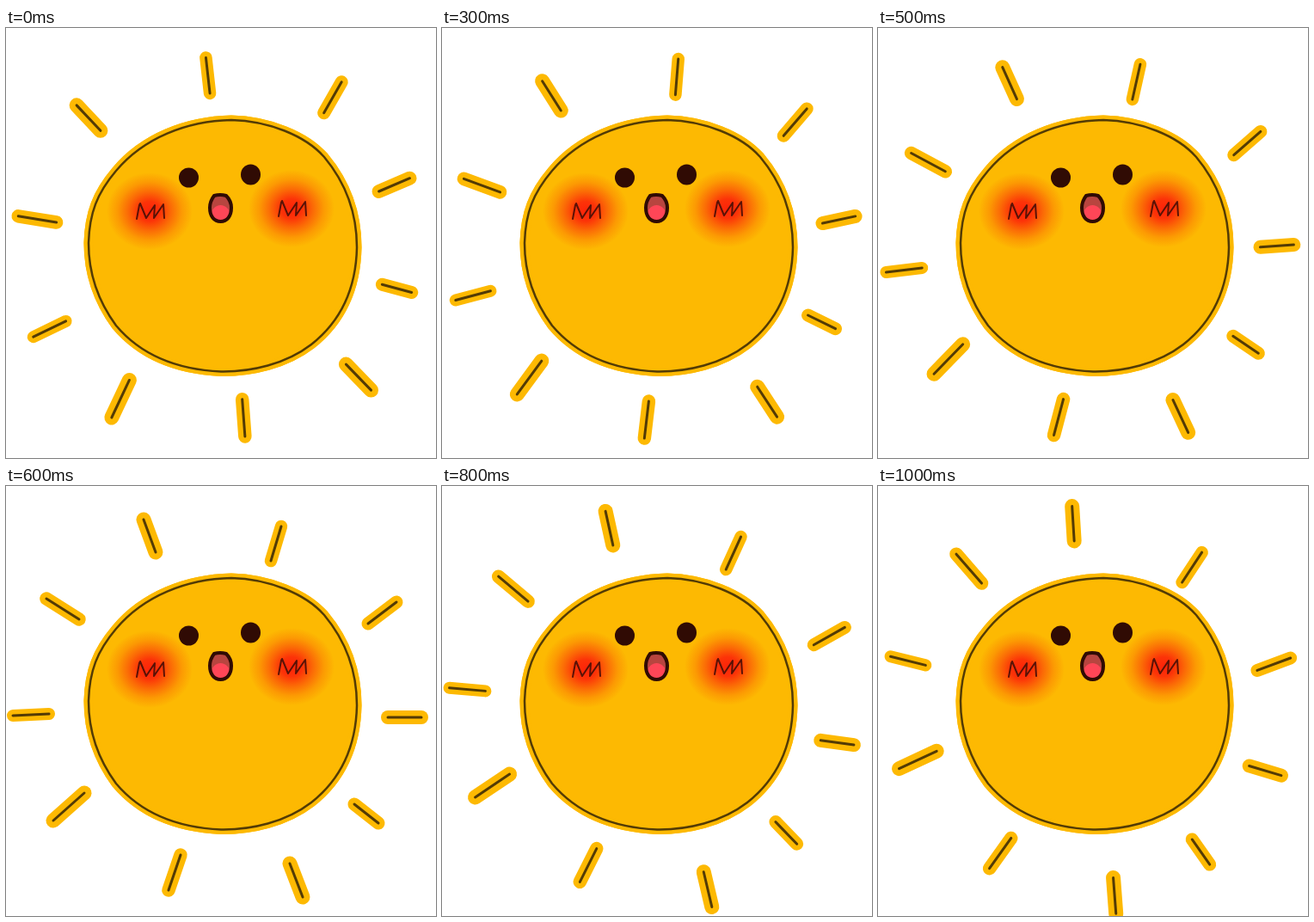
Recreate the animation shown at these times as an HTML page. Size 500x500 px, loop 1100 ms.

```html
<!DOCTYPE html>
<html lang="en">
<head>
<meta charset="utf-8">
<title>Sun</title>
<style>
  html, body { margin: 0; width: 100%; height: 100%; overflow: hidden; background: #fff; }
  svg { display: block; width: 100%; height: 100%; }
  path, line { fill: none; stroke-linecap: round; stroke-linejoin: round; }
  .glow { stroke: #fdb902; }
  .ink { stroke: #533b05; }
</style>
</head>
<body>
<svg viewBox="0 0 500 500">
  <defs>
    <radialGradient id="blush">
      <stop offset="0" stop-color="#fd2409"/>
      <stop offset=".25" stop-color="#fc3308"/>
      <stop offset=".5" stop-color="#fb6a06"/>
      <stop offset=".75" stop-color="#fc9a03"/>
      <stop offset="1" stop-color="#fdb902"/>
    </radialGradient>
    <path id="body" d="M262 107C305 108 348 125 370 150C395 180 408 215 408 255C407 305 388 342 355 368C325 391 285 400 250 399.5C195 397 155 378 128 346C106 316 96 285 96 250C97 215 106 192 128 166C160 128 210 108 262 107Z"/>
    <path id="mouth" d="M242 195Q249 193 256 195C260 199 262 204 262 209C262 219 257 225 249.500 225C242 225 237 219 237 209C237 204 239 199 242 195Z"/>
    <clipPath id="inside"><use href="#mouth"/></clipPath>
    <g id="cheek">
      <ellipse rx="50" ry="45" fill="url(#blush)"/>
      <path d="M-15 9L-12 -7L-11 -9L-4 8L6 -7L5 8L16 -8L17 8" stroke="#5a1206" stroke-width="2"/>
    </g>
  </defs>

  <g id="rays"></g>

  <use href="#body" class="glow" style="fill:#fdb902" stroke-width="11"/>
  <path class="glow" style="fill:#fdb902" stroke-width="11" d="M262 107C305 108 348 125 370 150C395 180 408 215 408 255C407 305 388 342 355 368C325 391 285 400 250 399.500C195 397 155 378 128 346C106 316 96 285 96 250C97 215 106 192 128 166C160 128 210 108 262 107Z"/>
  <use href="#body" class="ink" stroke-width="2.500"/>

  <use href="#cheek" x="167" y="213"/>
  <use href="#cheek" x="332" y="210"/>

  <g fill="#300b04">
    <ellipse cx="212.500" cy="174" rx="11.500" ry="11.500"/>
    <ellipse cx="284.500" cy="170.500" rx="11.500" ry="12"/>
  </g>

  <g clip-path="url(#inside)">
    <rect x="232" y="190" width="36" height="40" fill="#b8453f"/>
    <ellipse cx="249.500" cy="218" rx="11" ry="12" fill="#ff4657"/>
  </g>
  <use href="#mouth" stroke="#300b04" stroke-width="4"/>
</svg>
<script>
  const CENTER = [245.5, 255];
  const STEP = 100;
  // Turn in degrees at each step; the ray coordinates are drawn at REST.
  const TURNS = [0, 3.5, 7, 11, 15, 19, 23.1, 27, 30.9, 35.1, 39.8];
  const REST = 23.1;

  // Outer x, y, inner x, y, glow width
  const RAYS = [
    [320, 47, 308, 87, 14.5],
    [454, 135, 421, 160, 15],
    [483, 269, 444, 269, 16],
    [433, 392, 405, 370, 15],
    [345, 478, 330, 439, 17],
    [189, 470, 203, 429, 15.5],
    [55, 389, 91, 357, 17],
    [8, 267, 50, 265, 14],
    [47, 131, 85, 155, 15.5],
    [160, 39, 174, 77, 17]
  ];

  const rays = document.getElementById("rays");
  const bar = ([x1, y1, x2, y2], style, width) =>
    `<line class="${style}" x1="${x1}" y1="${y1}" x2="${x2}" y2="${y2}" stroke-width="${width}"/>`;

  rays.innerHTML = RAYS.map(r => bar(r, "glow", r[4]) + bar(r, "ink", 3)).join("");

  function draw() {
    const step = Math.floor(performance.now() / STEP) % TURNS.length;
    rays.setAttribute("transform", `rotate(${TURNS[step] - REST} ${CENTER})`);
    requestAnimationFrame(draw);
  }
  draw();
</script>
</body>
</html>
```
